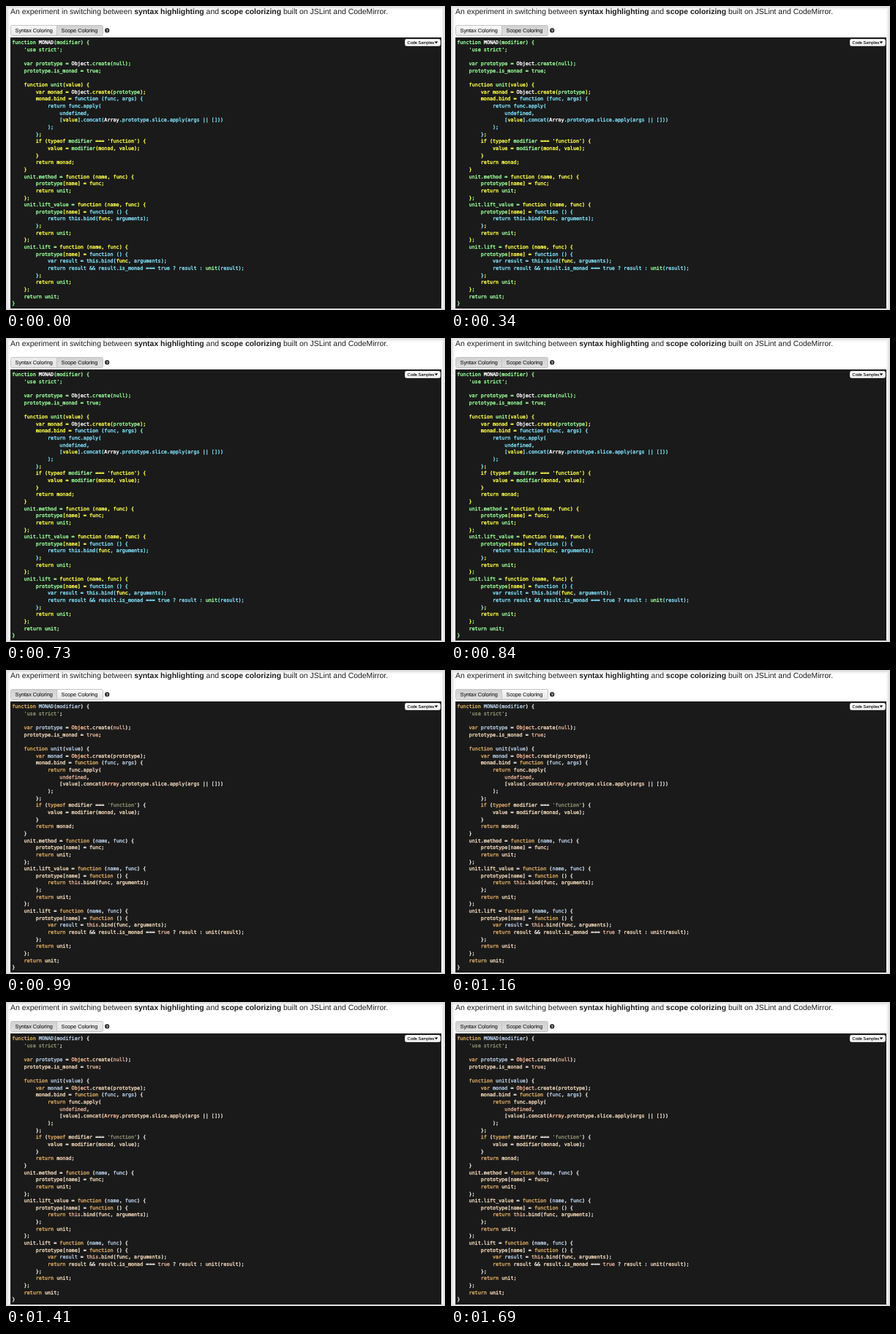
These frames come from a looping animation (600 px wide and 416 px high, 1790 ms). An HTML page with a canvas:

```html
<!DOCTYPE html>
<html lang="en">
<head>
<meta charset="utf-8">
<title>Scope coloring</title>
<style>
html, body { margin: 0; width: 100%; height: 100%; overflow: hidden; background: #fff; }
canvas { display: block; }
</style>
</head>
<body>
<canvas id="stage" width="600" height="416"></canvas>
<script>
const ctx = document.getElementById('stage').getContext('2d');
const SANS = '"Liberation Sans", Arial, sans-serif';
const MONO = '"DejaVu Sans Mono", monospace';
const CODE_SIZE = 6.76, LINE = 9.65;
ctx.textRendering = 'geometricPrecision';
ctx.lineJoin = 'round';

const code = `function MONAD(modifier) {
    'use strict';

    var prototype = Object.create(null);
    prototype.is_monad = true;

    function unit(value) {
        var monad = Object.create(prototype);
        monad.bind = function (func, args) {
            return func.apply(
                undefined,
                [value].concat(Array.prototype.slice.apply(args || []))
            );
        };
        if (typeof modifier === 'function') {
            value = modifier(monad, value);
        }
        return monad;
    }
    unit.method = function (name, func) {
        prototype[name] = func;
        return unit;
    };
    unit.lift_value = function (name, func) {
        prototype[name] = function () {
            return this.bind(func, arguments);
        };
        return unit;
    };
    unit.lift = function (name, func) {
        prototype[name] = function () {
            var result = this.bind(func, arguments);
            return result && result.is_monad === true ? result : unit(result);
        };
        return unit;
    };
    return unit;
}`;

const levels = ['#ffffff', '#99ff99', '#ffff4c', '#80e4ff'];
const styles = {
  keyword: '#dcaa62', atom: '#e0ad92', string: '#8f9070', def: '#b4cbe4',
  global: '#ffbd98', local: '#f2d8b8', plain: '#ece6e0'
};
const keywords = new Set(['function', 'var', 'return', 'if', 'typeof']);
const atoms = new Set(['null', 'true', 'undefined', 'this']);

// Each token gets a syntax style and the nesting level of its scope.
function tokenize(text) {
  const scopes = [{ names: new Set(['Object', 'Array']), open: 0 }];
  const out = [];
  let prev = '', inParams = false;

  const top = () => scopes.length - 1;
  const declare = (name, level) => {
    scopes[level].names.add(name);
    return level;
  };
  const lookup = name => {
    for (let i = top(); i >= 0; i--) if (scopes[i].names.has(name)) return i;
    return top();
  };

  text.split('\n').forEach((line, row) => {
    for (const match of line.matchAll(/'[^']*'|\w+|[^\s\w]/g)) {
      const word = match[0];
      let style = 'plain', level = top();
      if (word[0] === "'") style = 'string';
      else if (keywords.has(word)) {
        style = 'keyword';
        if (word === 'function') {
          scopes.push({ names: new Set(), open: 0 });
          level = top();
          inParams = true;
        }
      } else if (atoms.has(word)) style = 'atom';
      else if (/\w/.test(word)) {
        if (prev === '.') style = 'local';
        else if (prev === 'function') {
          style = 'def';
          level = declare(word, top() - 1);
        } else if (prev === 'var' || inParams) {
          style = 'def';
          level = declare(word, top());
        } else {
          level = lookup(word);
          style = level ? 'local' : 'global';
        }
      } else if (word === ')') inParams = false;
      else if (word === '{') scopes[top()].open++;
      else if (word === '}' && --scopes[top()].open === 0) scopes.pop();
      out.push({ word, row, col: match.index, style, level });
      prev = word;
    }
  });
  return out;
}
const tokens = tokenize(code);

function text(str, x, y, size, color, { weight = 'normal', family = SANS, heavy = 0 } = {}) {
  ctx.font = `${weight} ${size}px ${family}`;
  ctx.fillStyle = color;
  ctx.fillText(str, x, y);
  if (heavy) {
    ctx.strokeStyle = color;
    ctx.lineWidth = heavy;
    ctx.strokeText(str, x, y);
  }
  return x + ctx.measureText(str).width;
}

function fade(y, h, from, to) {
  const g = ctx.createLinearGradient(0, y, 0, y + h);
  g.addColorStop(0, from);
  g.addColorStop(1, to);
  return g;
}

function box(x, y, w, h, radii, fill, stroke) {
  ctx.beginPath();
  ctx.roundRect(x + 0.5, y + 0.5, w - 1, h - 1, radii);
  ctx.fillStyle = fill;
  ctx.fill();
  ctx.strokeStyle = stroke;
  ctx.lineWidth = 1;
  ctx.stroke();
}

// White page with a soft grey shade along its edges.
function page() {
  ctx.fillStyle = '#fff';
  ctx.fillRect(0, 0, 600, 416);
  ctx.lineWidth = 1;
  for (let i = 0; i < 6; i++) {
    ctx.strokeStyle = `rgba(0, 0, 0, ${0.15 * (1 - i / 6) ** 1.5})`;
    ctx.strokeRect(i + 0.5, i + 0.5, 599 - 2 * i, 415 - 2 * i);
  }
}

function heading() {
  const parts = ['An experiment in switching between ', 'syntax highlighting',
    ' and ', 'scope colorizing', ' built on JSLint and CodeMirror.'];
  let x = 6;
  parts.forEach((part, i) => {
    x = text(part, x, 10.8, 10.43, '#1a1a1a', { weight: i % 2 ? 'bold' : 'normal' });
  });
}

const fills = {
  idle: () => fade(26, 15, '#fafafa', '#e6e6e6'),
  hover: () => fade(26, 15, '#ececec', '#e6e6e6'),
  down: () => fade(26, 15, '#d0d0d0', '#e0e0e0')
};

function tab(label, x, w, radii, state) {
  box(x, 26, w, 15, radii, fills[state](), '#c4c4c4');
  text(label, x + 6.6, 35.9, 7.25, '#222', { heavy: 0.12 });
}

function help() {
  ctx.beginPath();
  ctx.arc(138.2, 33.4, 3.1, 0, Math.PI * 2);
  ctx.fillStyle = '#222';
  ctx.fill();
  text('?', 136.6, 35.5, 5.6, '#fff', { weight: 'bold' });
}

function samples() {
  box(545, 45, 49, 10, 2, fade(45, 10, '#ffffff', '#ececec'), '#dcdcdc');
  text('Code Samples', 548.6, 52.2, 5.6, '#111', { heavy: 0.12 });
  ctx.beginPath();
  ctx.moveTo(585.6, 48.6);
  ctx.lineTo(590.4, 48.6);
  ctx.lineTo(588, 51.6);
  ctx.fillStyle = '#111';
  ctx.fill();
}

function editor(scoped) {
  ctx.fillStyle = '#1a1a1a';
  ctx.fillRect(6, 43, 589, 371);
  const step = CODE_SIZE * 0.602;
  for (const t of tokens) {
    const color = scoped ? levels[t.level] : styles[t.style];
    text(t.word, 8.2 + t.col * step, 52.2 + t.row * LINE, CODE_SIZE, color,
      { family: MONO, heavy: 0.35 });
  }
}

function draw({ syntax, scope, scoped }) {
  page();
  heading();
  tab('Syntax Coloring', 6, 64, [2, 0, 0, 2], syntax);
  tab('Scope Coloring', 69, 64, [0, 2, 2, 0], scope);
  help();
  editor(scoped);
  samples();
}

const steps = [
  { until: 560, syntax: 'idle', scope: 'down', scoped: true },
  { until: 840, syntax: 'hover', scope: 'down', scoped: true },
  { until: 990, syntax: 'down', scope: 'down', scoped: true },
  { until: 1270, syntax: 'down', scope: 'idle', scoped: false },
  { until: 1690, syntax: 'down', scope: 'hover', scoped: false },
  { until: 1790, syntax: 'down', scope: 'down', scoped: false }
];
const start = performance.now();
let shown = null;

function tick() {
  const t = (performance.now() - start) % 1790;
  const step = steps.find(s => t < s.until);
  if (step !== shown) draw(shown = step);
  requestAnimationFrame(tick);
}
tick();
</script>
</body>
</html>
```
